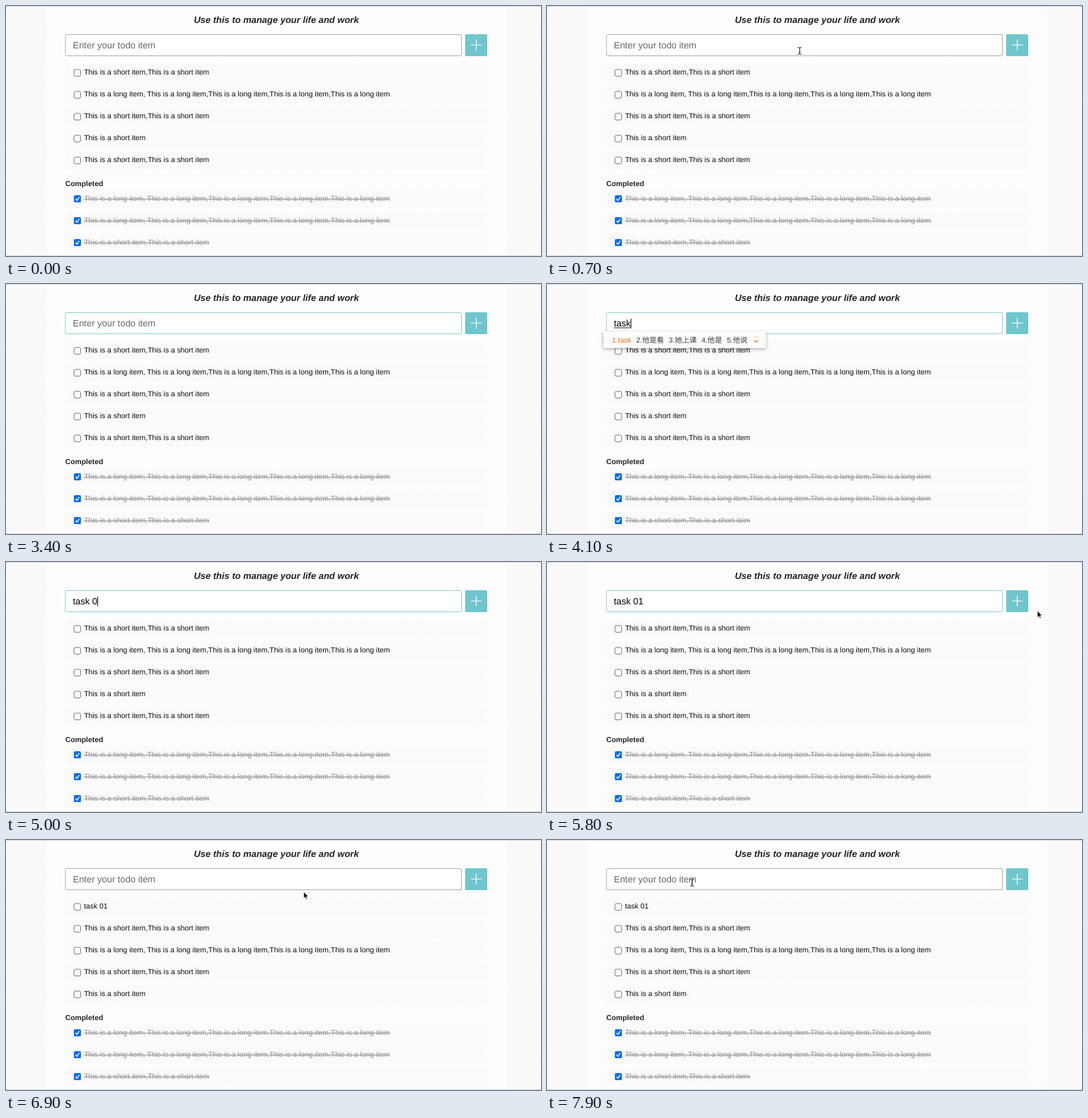
Recreate the animation shown at these times as an HTML page. Size 756 by 354 pixels, loop 8 s.

```html
<!DOCTYPE html>
<html lang="en">
<head>
<meta charset="utf-8">
<title>Todo list</title>
<style>
  html, body { margin: 0; width: 100%; height: 100%; overflow: hidden; background: #fafafa; }
  svg { display: block; width: 756px; height: 354px; }
  text {
    font-family: "Liberation Sans", Arial, "Noto Sans CJK SC", "Noto Sans CJK", sans-serif;
    text-rendering: geometricPrecision;
    white-space: pre;
  }
  .item { font-size: 10.385px; fill: #0c0c0c; }
  .done { fill: #929292; }
  .head { font-size: 10.37px; font-weight: bold; fill: #222; }
  .title { font-size: 12.96px; font-weight: bold; font-style: italic; fill: #222; text-anchor: middle; }
  .entry { font-size: 12.96px; }
  .cand { font-size: 10.3px; fill: #3c3c3c; }
  .first { fill: #e2741c; }
</style>
</head>
<body>
<svg viewBox="0 0 756 354" xmlns="http://www.w3.org/2000/svg">
  <defs>
    <pattern id="paper" width="12" height="10" patternUnits="userSpaceOnUse">
      <path d="M0 5 Q3 1 6 5 T12 5 M2 10 L5 6 M8 3 L11 0" fill="none" stroke="#f5f5f5" stroke-width=".8"/>
    </pattern>
    <filter id="shadow" x="-10%" y="-40%" width="120%" height="200%">
      <feDropShadow dx="0" dy="1.5" stdDeviation="2" flood-color="#000" flood-opacity=".35"/>
    </filter>
  </defs>
  <rect width="756" height="354" fill="#fafafa"/>
  <rect width="756" height="354" fill="url(#paper)"/>
  <rect x="57" width="650" height="354" fill="#fdfdfd"/>
  <path d="M0 .5H756M0 353.5H756" stroke="#dcdcdc"/>
  <text class="title" x="382" y="24.1">Use this to manage your life and work</text>
  <rect id="field" x="84" y="40.5" width="559.5" height="30" rx="1.5" fill="#fff"/>
  <text id="entry" class="entry" x="94.5" y="60"></text>
  <rect id="underline" x="94.5" y="61.5" height="1" fill="#222"/>
  <rect id="caret" y="49" width="1" height="13.5" fill="#111"/>
  <rect id="button" x="648.8" y="40" width="31.2" height="31" rx="1.5"/>
  <path d="M656.8 55.2h15.4M664.5 47.5v15.4" stroke="#fff" stroke-width="1.1"/>
  <g id="rows"></g>
  <text class="head" x="83.7" y="255.2">Completed</text>
  <g id="popup">
    <rect id="sheet" x="79" y="67" height="23.5" fill="#fcfcfc" filter="url(#shadow)"/>
    <path d="M79.5 70V89" stroke="#c4c4c4" stroke-width="1.6" stroke-dasharray="1.6 2.6"/>
    <text id="words" class="cand" x="91.7" y="82.7"></text>
    <g id="more" fill="none">
      <path d="M-2.7 -1.4L0 -4.1L2.7 -1.4" stroke="#f0c4a4"/>
      <path d="M-2.7 1.4L0 4.1L2.7 1.4" stroke="#e2741c" stroke-width="1.2"/>
    </g>
  </g>
  <path id="arrow" d="M0 0V9.6L2.2 7.6L3.7 11L5.4 10.3L3.9 7H6.9Z" fill="#111" stroke="#fff" stroke-width=".8"/>
  <path id="beam" d="M-2.6 -5Q0 -5 0 -3.6Q0 -5 2.6 -5M0 -4V4M-2.6 5Q0 5 0 3.6Q0 5 2.6 5M-1.2 1.6H1.2" fill="none" stroke="#222"/>
</svg>
<script>
const LOOP = 8000, STEP = 100;
const FOCUS = 1400, COMMIT = 4400, PRESS = 6300, ADD = 6400;
const $ = id => document.getElementById(id);

const single = "This is a short item";
const pair = single + "," + single;
const long = "This is a long item";
const longRow = long + ", " + Array(4).fill(long).join(",");
const before = [pair, longRow, pair, single, pair];
const completed = [longRow, longRow, pair];

const phrase = "task 01";
const keyTimes = [3500, 3700, 3900, 4000, 4600, 5000, 5200];
const candidates = [
  "他 她 它 天 听", "他 她 它 塔 踏", "他是 她是 他说 她说 它是", "task 他是看 她上课 他是 他说"
].map(s => s.split(" "));

// each move runs from the previous resting point, optionally bent towards "via"
const origin = [663, 328];
const moves = [
  { start: 200, end: 700, to: [357, 63.5] },
  { start: 1200, end: 1300, to: [362.5, 60.6] },
  { start: 5400, end: 6200, to: [667.5, 56], via: [786, 90] },
  { start: 6800, end: 7100, to: [223, 87] },
  { start: 7200, end: 7500, to: [128, 96.5] },
  { start: 7700, end: 7900, to: [205, 60.5] }
];

function pointer(t) {
  if (t < 200 || (t >= 3400 && t < 5500)) return null;
  let at = origin;
  for (const { start, end, to, via } of moves) {
    if (t < start) break;
    const f = Math.min(1, (t - start) / (end - start));
    const e = f * (2 - f);
    at = at.map((a, i) => {
      const mid = via ? via[i] : (a + to[i]) / 2;
      return a * (1 - e) ** 2 + 2 * mid * e * (1 - e) + to[i] * e * e;
    });
  }
  return at;
}

function row(y, label, done) {
  const box = done
    ? `<rect x="95.9" y="${y - 4.9}" width="10" height="10" rx="1.7" fill="#0a6eec"/>
       <path d="M98.3 ${y + .3}l1.9 2l3.3 -4.6" fill="none" stroke="#fff" stroke-width="1.3"/>`
    : `<rect x="96.1" y="${y - 4.5}" width="9.3" height="9.4" rx="1.7" fill="#fff" stroke="#6c6c6c" stroke-width=".9"/>`;
  const strike = done ? ' text-decoration="line-through"' : "";
  const textY = y + (done ? 3.1 : 2.8);
  return `<rect x="84" y="${y - 12.5}" width="596" height="25" fill="#fbfbfb"/>
    <rect x="84" y="${y - 12.5}" width="596" height="25" fill="url(#paper)" opacity=".6"/>${box}
    <text class="item${done ? " done" : ""}" x="110.2" y="${textY}"${strike}>${label}</text>`;
}

const rows = items =>
  items.map((s, i) => row(94.5 + 31 * i, s, false)).join("") +
  completed.map((s, i) => row(273 + 31 * i, s, true)).join("");

const show = (id, on) => $(id).setAttribute("visibility", on ? "visible" : "hidden");
const cache = {};
function fill(id, html) {
  if (cache[id] !== html) $(id).innerHTML = cache[id] = html;
}

function drawPopup(words) {
  fill("words", words.map((word, i) =>
    `<tspan ${i ? 'dx="6.7"' : 'class="first"'}>${i + 1}.${word}</tspan>`).join(""));
  const box = $("words").getBBox();
  const right = box.x + box.width;
  $("sheet").setAttribute("width", right - 53);
  $("more").setAttribute("transform", `translate(${right + 12.2} 78.2)`);
}

function drawEntry(t) {
  const typed = keyTimes.filter(k => k <= t).length;
  const text = t < ADD ? phrase.slice(0, typed) : "";
  const focused = t >= FOCUS && t < PRESS;
  const composing = t >= keyTimes[0] && t < COMMIT;
  const lastInput = Math.max(...[FOCUS + STEP, COMMIT, ...keyTimes].filter(k => k <= t));

  $("field").setAttribute("stroke", focused ? "#98d0d0" : "#b0b0b0");
  $("entry").textContent = text || "Enter your todo item";
  $("entry").setAttribute("fill", text ? "#000" : "#666");
  const width = text ? $("entry").getComputedTextLength() : 0;
  $("underline").setAttribute("width", width);
  $("caret").setAttribute("x", 94.5 + width);
  show("underline", composing);
  show("caret", focused && (t - lastInput) % 1000 < 500);
  show("popup", composing);
  if (composing) drawPopup(candidates[typed - 1]);
}

function drawPointer(t) {
  const p = pointer(t);
  const inField = p && p[0] > 84 && p[0] < 644 && p[1] > 40 && p[1] < 71;
  show("beam", p && inField);
  show("arrow", p && !inField);
  if (p) $(inField ? "beam" : "arrow").setAttribute("transform", `translate(${p[0]} ${p[1]})`);
}

function draw(t) {
  const pressed = t >= PRESS && t < ADD;
  $("button").setAttribute("fill", pressed ? "#27bccc" : "#70c6ce");
  fill("rows", rows(t < ADD ? before : [phrase, ...before.slice(0, 4)]));
  drawEntry(t);
  drawPointer(t);
}

function tick() {
  const t = performance.now() % LOOP;
  draw(Math.floor(t / STEP) * STEP);
  requestAnimationFrame(tick);
}
tick();
</script>
</body>
</html>
```
